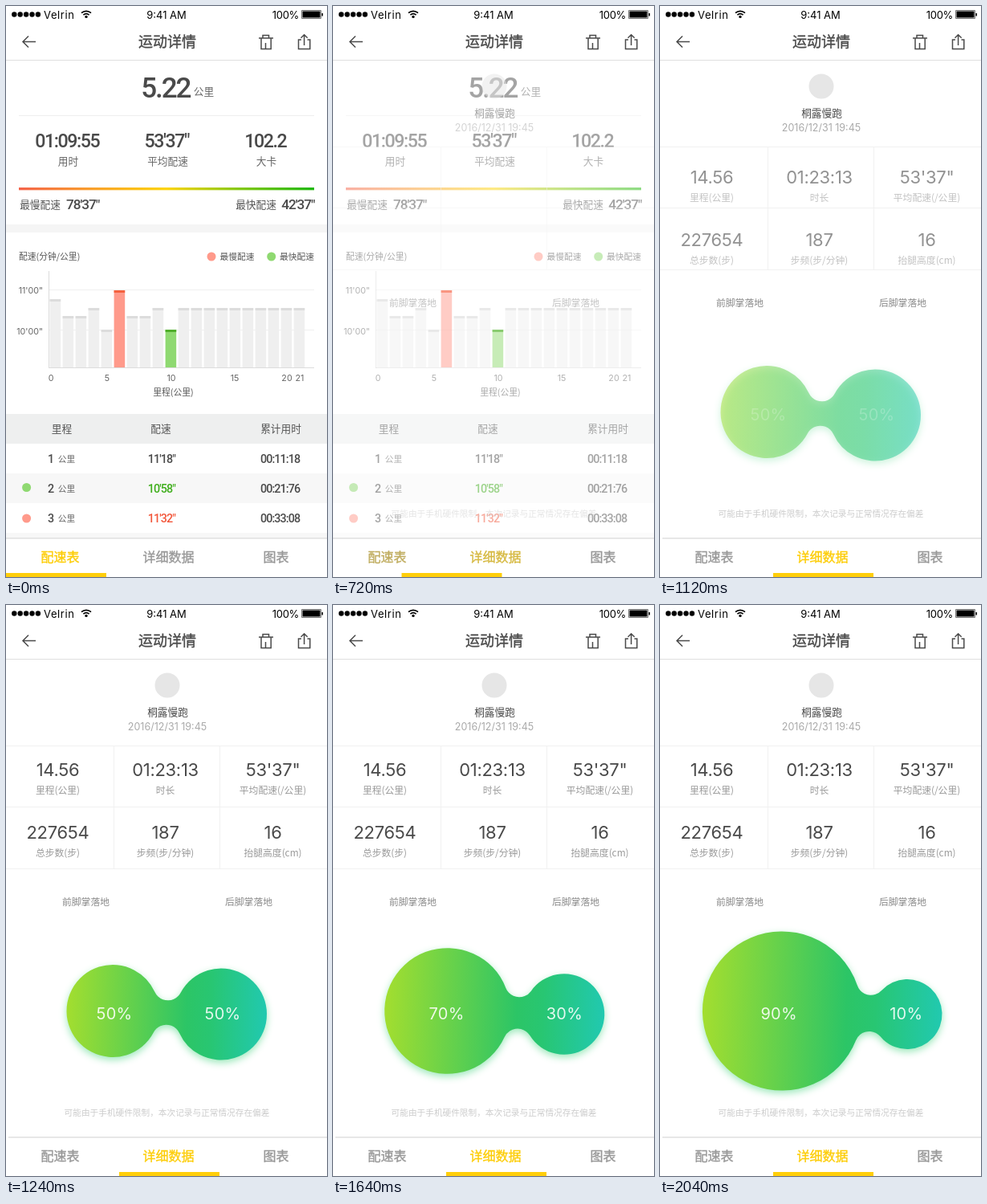
An HTML page with a canvas that plays this animation: 400x711 px, repeating every 3 s.

```html
<!DOCTYPE html>
<html lang="zh">
<head>
<meta charset="utf-8">
<title>运动详情</title>
<style>
html, body { margin: 0; width: 100%; height: 100%; overflow: hidden; background: #fff; }
canvas { display: block; width: 400px; height: 711px; }
</style>
</head>
<body>
<canvas id="stage"></canvas>
<script>
const W = 400, H = 711, LOOP = 3000, STEP = 40;
const canvas = document.getElementById('stage');
const ctx = canvas.getContext('2d');
const ratio = window.devicePixelRatio || 1;
canvas.width = W * ratio;
canvas.height = H * ratio;

const SANS = 'Inter, "Noto Sans CJK SC", "Noto Sans CJK", sans-serif';
const HAN = '"Noto Sans CJK SC", "Noto Sans CJK", sans-serif';
const DARK = '#4a4a4a', YELLOW = [253, 205, 8], GREY = [153, 153, 153];
const RED = '#ff9a8b', GREEN = '#8fd971';

const clamp = v => Math.min(1, Math.max(0, v));
const span = (t, from, to) => clamp((t - from) / (to - from));
const mix = (a, b, p) => `rgb(${a.map((v, i) => Math.round(v + (b[i] - v) * p))})`;

// y is the visual middle of the glyphs, thick adds a thin outline for a medium weight
function text(s, x, y, size, color = DARK, { align = 'center', font = HAN, weight = 400, gap = 0, thick = 0 } = {}) {
  ctx.font = `${weight} ${size}px ${font}`;
  ctx.letterSpacing = gap + 'px';
  ctx.textAlign = align;
  ctx.fillStyle = color;
  const base = y + size * 0.365;
  ctx.fillText(s, x, base);
  if (thick) {
    ctx.strokeStyle = color;
    ctx.lineWidth = thick;
    ctx.strokeText(s, x, base);
  }
}

// tightly set figures
function figures(s, x, y, size, color = DARK, align = 'center') {
  const gap = -0.062 * size;
  const shift = { left: 0, center: gap / 2, right: gap }[align];
  text(s, x + shift, y, size, color, { align, font: 'Roboto, sans-serif', weight: 500, gap });
}

function rect(x, y, w, h, color) {
  ctx.fillStyle = color;
  ctx.fillRect(x, y, w, h);
}

function dot(x, y, r, color) {
  ctx.fillStyle = color;
  ctx.beginPath();
  ctx.arc(x, y, r, 0, Math.PI * 2);
  ctx.fill();
}

function stroke(path, width = 1.5, color = DARK) {
  ctx.strokeStyle = color;
  ctx.lineWidth = width;
  ctx.stroke(new Path2D(path));
}

function header() {
  for (let i = 0; i < 5; i++) dot(10.3 + i * 7.4, 10.5, 3.2, '#000');
  const bar = { font: SANS };
  text('Velrin', 47, 11, 13, '#000', { ...bar, align: 'left', gap: 0.6 });
  text('9:41 AM', 200, 11, 13, '#000', bar);
  text('100%', 365, 11, 13, '#000', { ...bar, align: 'right', gap: -0.3 });
  stroke('M94 8.6 A9 9 0 0 1 106 8.6 M96.4 11.2 A5.5 5.5 0 0 1 103.6 11.2', 1.7, '#000');
  dot(100, 13.4, 1.7, '#000');
  stroke('M368.5 5.5 H392.5 V15.5 H368.5 Z', 1, '#777');
  rect(369.5, 6.5, 22, 8, '#000');
  rect(393.5, 9, 1.5, 3.5, '#000');

  stroke('M37 44.5 H21.5 M28 37.5 L21 44.5 L28 51.5');
  text('运动详情', 201, 44, 18, DARK, { thick: 0.4 });
  stroke('M315 40 H333 M320 40 V36.5 H327.5 V40 M318 40 V53.5 H330.2 V40 M323.5 46 V53');
  stroke('M368 42 H364.5 V53.5 H378.8 V42 H375.5 M371.6 49 V36 M367.5 39.8 L371.6 35.7 L375.7 39.8');
  rect(0, 67, W, 1, '#dfdfdf');
}

function chart() {
  text('配速(分钟/公里)', 16, 312, 10.8, '#555', { align: 'left' });
  dot(256, 312, 5.5, RED);
  text('最慢配速', 288, 312, 10.7, '#555');
  dot(330.7, 312, 5.5, GREEN);
  text('最快配速', 362.5, 312, 10.7, '#555');

  rect(53, 353, 331, 1, '#f0f0f0');
  rect(53, 403, 331, 1, '#f0f0f0');
  const small = { font: SANS };
  text('11\'00"', 46, 354, 10.7, '#666', { ...small, align: 'right' });
  text('10\'00"', 46, 405, 10.7, '#666', { ...small, align: 'right' });

  const tops = [365, 386, 386, 376, 403, 354, 386, 386, 376, 403];
  for (let i = 0; i < 20; i++) {
    const x = 54.6 + i * 16, top = tops[i] || 376;
    const [fill, cap] = i === 5 ? [RED, '#f4623f'] : i === 9 ? [GREEN, '#4fae2a'] : ['#efefef', '#dcdcdc'];
    rect(x, top, 13.6, 450 - top, fill);
    rect(x, top, 13.6, 3, cap);
  }
  rect(53, 330, 1, 121, '#dcdcdc');
  rect(53, 450, 331, 1, '#dcdcdc');
  [[0, 56], [5, 126], [10, 206], [15, 285], [20, 350], [21, 366]]
    .forEach(([n, x]) => text(String(n), x, 463, 10.7, '#666', small));
  text('里程(公里)', 208.5, 481, 10.8, '#555');
}

function table() {
  rect(0, 508, W, 37, '#eeefef');
  text('里程', 69.5, 526, 12.7, '#555');
  text('配速', 193, 526, 12.7, '#555');
  text('累计用时', 342.5, 526, 12.7, '#555');
  const rows = [
    ['11\'18"', '00:11:18', DARK],
    ['10\'58"', '00:21:76', '#3fae1c', GREEN],
    ['11\'32"', '00:33:08', '#f2563a', RED]
  ];
  rect(0, 582, W, 37, '#f7f7f7');
  rect(0, 656, W, 6, '#f7f7f7');
  rows.forEach(([pace, total, color, mark], i) => {
    const y = 564 + i * 37;
    if (mark) dot(25.6, y - (i === 1 ? 1.5 : 0), 5.5, mark);
    figures(String(i + 1), 56, y, 14.3);
    text('公里', 75.5, y, 10.7, '#666');
    figures(pace, 194.3, y, 14.3, color);
    figures(total, 342, y, 14.3);
  });
}

function pacePage() {
  figures('5.22', 199.8, 101, 35);
  text('公里', 246.5, 106, 12.7, '#666');
  rect(16, 136, 368, 1, '#eee');
  [['01:09:55', '用时', 77], ['53\'37"', '平均配速', 201], ['102.2', '大卡', 324]].forEach(([n, label, x]) => {
    figures(n, x, 168, 23.2);
    text(label, x + 0.5, 193, 12.7, '#666');
  });
  const g = ctx.createLinearGradient(16, 0, 384, 0);
  ['#f4634a', '#f9a02c', '#fdd40a', '#83c815', '#1fb80b'].forEach((c, i) => g.addColorStop(i / 4, c));
  rect(16, 226, 368, 3.3, g);
  text('最慢配速', 42.5, 247, 12.7, '#555');
  figures('78\'37"', 75, 247, 17.2, DARK, 'left');
  text('最快配速', 311.5, 247, 12.7, '#555');
  figures('42\'37"', 385.5, 247, 17.2, DARK, 'right');
  rect(0, 272, W, 10, '#f5f5f5');
  chart();
  table();
}

function detailPage() {
  dot(201, 100, 15.5, '#e6e6e6');
  text('桐露慢跑', 201.5, 133, 12.7);
  text('2016/12/31 19:45', 201, 151.5, 12.5, '#aaa', { font: SANS });
  [175, 251, 328].forEach(y => rect(0, y, W, 1, '#f1f1f1'));
  [134, 266].forEach(x => rect(x, 176, 1, 152, '#f1f1f1'));
  text('前脚掌落地', 99.5, 370, 11.8, '#888');
  text('后脚掌落地', 302.5, 370, 11.8, '#888');
  text('可能由于手机硬件限制，本次记录与正常情况存在偏差', 200.5, 632, 10.66, '#ccc');
}

function stats(rise) {
  const cells = [
    ['14.56', '里程(公里)'], ['01:23:13', '时长'], ['53\'37"', '平均配速(/公里)'],
    ['227654', '总步数(步)'], ['187', '步频(步/分钟)'], ['16', '抬腿高度(cm)']
  ];
  cells.forEach(([n, label], i) => {
    const x = [64.5, 198.5, 332.5][i % 3], y = 205 + (i > 2 ? 78 : 0) + rise;
    text(n, x, y, 22, DARK, { font: SANS, gap: -0.3 });
    text(label, x, y + 26, 11.8, '#999');
  });
}

// two discs joined by fillets of a fixed radius
function blob(share) {
  const k = share - 50, PI = Math.PI, fillet = 18;
  const x1 = 133 + k * 0.475, y1 = 505.5, r1 = 57.5 + k * 1.04;
  const x2 = 268 + k, y2 = 509.5, r2 = 57 - k * 0.3375;
  const d = Math.hypot(x2 - x1, y2 - y1);
  const a = (d * d + (r1 + fillet) ** 2 - (r2 + fillet) ** 2) / (2 * d);
  const h = Math.sqrt((r1 + fillet) ** 2 - a * a);
  const alpha = Math.atan2(h, a), beta = Math.atan2(h, a - d);

  ctx.save();
  ctx.translate(x1, y1);
  ctx.rotate(Math.atan2(y2 - y1, x2 - x1));
  const g = ctx.createLinearGradient(-r1, 0, d + r2, 0);
  g.addColorStop(0, '#a3de2f');
  g.addColorStop(0.6, '#2cc566');
  g.addColorStop(0.72, '#28c672');
  g.addColorStop(1, '#21c9b0');
  ctx.fillStyle = g;
  ctx.shadowColor = 'rgba(60, 210, 120, 0.5)';
  ctx.shadowBlur = 10 * ratio;
  ctx.shadowOffsetY = 3.5 * ratio;
  ctx.beginPath();
  ctx.arc(0, 0, r1, alpha, 2 * PI - alpha);
  ctx.arc(a, -h, fillet, PI - alpha, PI - beta, true);
  ctx.arc(d, 0, r2, -beta, beta);
  ctx.arc(a, h, fillet, beta - PI, alpha - PI, true);
  ctx.fill();
  ctx.restore();
}

function shares(share) {
  const k = share - 50, n = Math.floor(share + 1e-6);
  const white = 'rgba(255, 255, 255, 0.88)';
  const style = { font: SANS, gap: 0.3 };
  text(n + '%', 135 + k * 0.33, 509, 20, white, style);
  text(100 - n + '%', 270 + k * 0.92, 509, 20, white, style);
}

function tabs(p) {
  rect(0, 662, W, 49, '#fff');
  rect(p < 1 ? 0 : 3, 662, W, 1.5, '#e0e0e0');
  const style = { thick: 0.4 };
  text('配速表', 67.5, 686, 16, mix(YELLOW, GREY, p), style);
  text('详细数据', 202.5, 686, 16, mix(GREY, YELLOW, p), style);
  text('图表', 336.5, 686, 16, mix(GREY, GREY, p), style);
  rect(141 * p, 706, 125, 5, '#ffce0a');
}

function layer(alpha, draw) {
  if (alpha <= 0) return;
  ctx.save();
  ctx.globalAlpha = alpha;
  draw();
  ctx.restore();
}

function render(t) {
  ctx.setTransform(ratio, 0, 0, ratio, 0, 0);
  rect(0, 0, W, H, '#fff');
  const swap = span(t, 560, 880);
  const slide = 1 - (1 - span(t, 520, 880)) ** 1.15;
  const show = span(t, 1000, 1200);
  const glow = span(t, 1040, 1200);
  const share = 50 + 40 * span(t, 1245, 2035);

  layer(1 - swap, pacePage);
  layer(swap, detailPage);
  layer(show, () => stats(20 * (1 - show)));
  layer(glow, () => blob(share));
  layer(glow ** 2, () => shares(share));
  header();
  tabs(slide);
}

function tick() {
  const t = performance.now() % LOOP;
  render(Math.floor(t / STEP) * STEP);
  requestAnimationFrame(tick);
}
tick();
</script>
</body>
</html>
```
